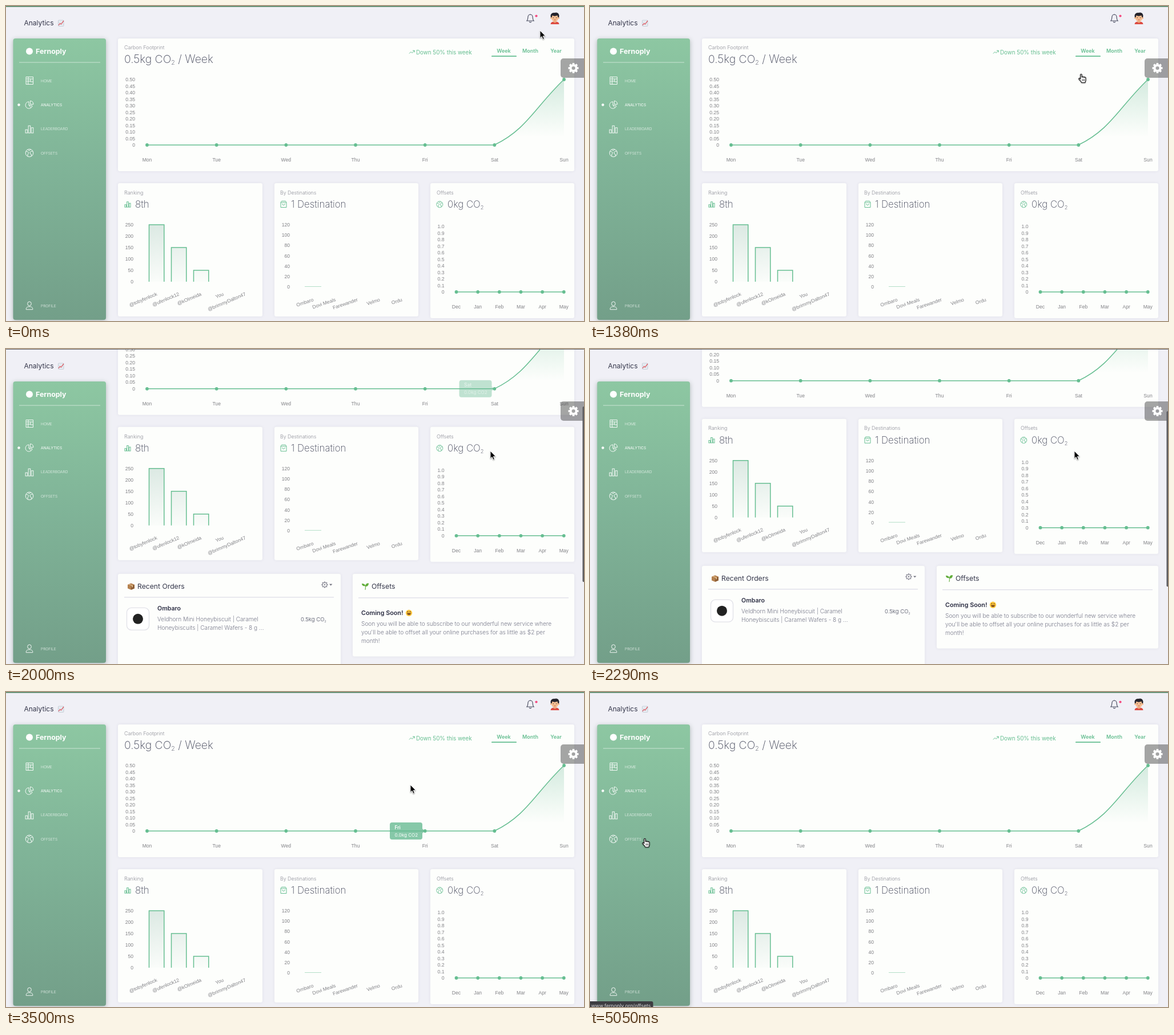
An HTML page with a canvas that plays this animation: 1012 by 553 pixels, repeating every 5090 ms.

```html
<!DOCTYPE html>
<html lang="en">
<head>
<meta charset="utf-8">
<title>Analytics</title>
<style>
html, body { margin: 0; width: 100%; height: 100%; overflow: hidden; background: #f0f0f6; }
canvas { display: block; width: 1012px; height: 553px; }
</style>
</head>
<body>
<canvas id="stage"></canvas>
<script>
const W = 1012, H = 553, LOOP = 5090;
const GREEN = '#66be91', DARK = '#44475b', GREY = '#8c8c97', AXIS = '#818186';
const UI = 'Inter, "Open Sans", sans-serif';
const CHART = '"Liberation Sans", Arial, sans-serif';

const canvas = document.getElementById('stage');
const dpr = window.devicePixelRatio || 1;
canvas.width = W * dpr;
canvas.height = H * dpr;
const c = canvas.getContext('2d');

// Rows of [time, value, ...]
const SCROLL = [[1450, 0], [2000, 174], [2190, 190], [2300, 188], [2590, 93], [2900, 0]];
const POINTER = [
  [0, 935, 43], [450, 925, 62], [950, 872, 76], [1200, 866, 83], [1380, 860, 119],
  [1560, 848, 179], [2680, 848, 179], [3100, 800, 196], [3500, 708, 163],
  [3850, 728, 90], [4210, 769, 26], [4420, 740, 34], [4920, 120, 246], [5050, 96, 257]
];

// Monotone cubic through the keys, flat at turning points
function track(keys, t, k = 1) {
  const last = keys.length - 1;
  if (t <= keys[0][0]) return keys[0][k];
  if (t >= keys[last][0]) return keys[last][k];
  let i = 0;
  while (t >= keys[i + 1][0]) i++;
  const rate = j => (keys[j + 1][k] - keys[j][k]) / (keys[j + 1][0] - keys[j][0]);
  const slope = j => {
    if (j === 0 || j === last) return 0;
    const a = rate(j - 1), b = rate(j);
    return a * b <= 0 ? 0 : 2 * a * b / (a + b);
  };
  const d = keys[i + 1][0] - keys[i][0], u = (t - keys[i][0]) / d, v = 1 - u;
  return keys[i][k] * v * v * (1 + 2 * u) + slope(i) * d * u * v * v +
    keys[i + 1][k] * u * u * (3 - 2 * u) - slope(i + 1) * d * u * u * v;
}

const clamp = v => Math.max(0, Math.min(1, v));
const pulse = (t, a, b, up, down) => clamp((t - a) / up) * clamp((b - t) / down);

function text(s, x, y, size, color, weight = 400, align = 'left', family = UI) {
  c.font = `${weight} ${size}px ${family}`;
  c.fillStyle = color;
  c.textAlign = align;
  c.fillText(s, x, y);
  return c.measureText(s).width;
}

function co2(before, after, x, y, size, weight = 200) {
  x += text(before + 'CO', x, y, size, DARK, weight);
  x += text('2', x, y + size * .17, size * .55, DARK, weight);
  text(after, x, y, size, DARK, weight);
}

function box(x, y, w, h, r, fill) {
  c.beginPath();
  c.roundRect(x, y, w, h, r);
  c.fillStyle = fill;
  c.fill();
}

function dot(x, y, r, fill) {
  c.beginPath();
  c.arc(x, y, r, 0, 7);
  c.fillStyle = fill;
  c.fill();
}

function line(points, color, width = 1) {
  c.beginPath();
  points.forEach(([x, y]) => c.lineTo(x, y));
  c.strokeStyle = color;
  c.lineWidth = width;
  c.stroke();
}

// Path data drawn with its zero point at x, y
function shape(d, x, y, fill, stroke, width = 1) {
  const p = new Path2D(d);
  c.save();
  c.translate(x, y);
  if (fill) { c.fillStyle = fill; c.fill(p); }
  if (stroke) { c.strokeStyle = stroke; c.lineWidth = width; c.stroke(p); }
  c.restore();
}

function fade(y0, y1, from, to) {
  const g = c.createLinearGradient(0, y0, 0, y1);
  g.addColorStop(0, from);
  g.addColorStop(1, to);
  return g;
}

function card(x, y, w, h) {
  c.save();
  c.shadowColor = 'rgba(90,90,130,.1)';
  c.shadowBlur = 5 * dpr;
  box(x, y, w, h, 3, '#fdfefc');
  c.restore();
}

function ticks(labels, right, top, step) {
  labels.forEach((s, i) => text(s, right, top + i * step + 3, 8.6, AXIS, 400, 'right', CHART));
}

function slanted(labels, x, y, step, deg) {
  labels.forEach((s, i) => {
    c.save();
    c.translate(x + i * step, y);
    c.rotate(-deg * Math.PI / 180);
    text(s, 0, 3, 8.6, AXIS, 400, 'right', CHART);
    c.restore();
  });
}

function barsIcon(x, y, k, color, width) {
  const u = v => v * k;
  c.strokeStyle = color;
  c.lineWidth = width;
  [[-6, 5], [-1.6, 11], [2.8, 8]].forEach(([dx, h]) =>
    c.strokeRect(x + u(dx), y + u(6 - h), u(3.1), u(h)));
}

function globe(x, y, r, color, width) {
  c.save();
  c.translate(x, y);
  c.scale(r / 7, r / 7);
  shape('M7 0A7 7 0 1 1-7 0A7 7 0 1 1 7 0M-6-3L-3-2L-1 0L-3 2L-3 6M-3-6L-1-4L1-5L2-6.5M6-3L3-3L1-1L2 2L4 3L3 6',
    0, 0, null, color, width * 7 / r);
  c.restore();
}

function gear(x, y, r, color) {
  c.save();
  c.translate(x, y);
  c.fillStyle = c.strokeStyle = color;
  for (let i = 0; i < 8; i++) {
    c.fillRect(-r * .2, -r, r * .4, r * .5);
    c.rotate(Math.PI / 4);
  }
  c.beginPath();
  c.arc(0, 0, r * .56, 0, 7);
  c.lineWidth = r * .44;
  c.stroke();
  c.restore();
}

function header() {
  shape('M-6 4C-4 2-4.5-1-4-3A4 4 0 0 1 4-3C4.5-1 4 2 6 4ZM-1.7 5.5A1.8 1.8 0 0 0 1.7 5.5M0-7V-8', 918, 22, null, DARK, 1.1);
  dot(928.5, 17.5, 2.1, '#f5487f');
  shape('M-7.5 10C-7 6-4 5.5 0 5.5S7 6 7.5 10Z', 961, 22, '#dd4b42');
  box(958.5, 23, 5, 6.5, 2, '#e9a678');
  dot(954.5, 21, 1.6, '#f0b185');
  dot(967.5, 21, 1.6, '#f0b185');
  box(954.8, 13, 12.4, 14, 6, '#f5bd91');
  shape('M-7-2C-9-8-4-11 0-10C5-12 9-7 7-2L5.5-2L4.5-5.5C1-4-2-4-4.5-5.5L-5.5-2Z', 961, 22, '#24232c');
  dot(958.4, 20.6, .7, '#333');
  dot(963.6, 20.6, .7, '#333');
  line([[959.4, 24], [961, 24.6], [962.6, 24]], '#b84f47', .8);
}

function footprint() {
  card(196, 57, 799, 233);
  text('Carbon Footprint', 207, 76, 9, GREY, 300);
  co2('0.5kg ', ' / Week', 207, 100, 19.4);
  line([[706, 83.5], [709, 80.5], [711, 82.5], [715, 78.5]], GREEN, 1);
  line([[712, 78.2], [715.3, 78.2], [715.3, 81.4]], GREEN, 1);
  text('Down 50% this week', 718, 84.5, 9.8, GREEN);
  [['Week', 871.5], ['Month', 918], ['Year', 963]].forEach(([s, x]) => text(s, x, 82.3, 9, GREEN, 600, 'center'));
  box(850, 87.3, 44, 1.7, 1, GREEN);

  ticks(['0.50', '0.45', '0.40', '0.35', '0.30', '0.25', '0.20', '0.15', '0.10', '0.05', '0'], 226, 129, 11.5);
  const rise = 'M855 244C911.5 217.4 928.3 175 977 129';
  shape(rise + 'V244Z', 0, 0, fade(129, 230, 'rgba(102,180,145,.27)', 'rgba(102,190,145,0)'));
  shape('M247 244H855' + rise.slice(8), 0, 0, null, GREEN, 1.5);
  ['Mon', 'Tue', 'Wed', 'Thu', 'Fri', 'Sat', 'Sun'].forEach((s, i) => {
    const x = 247 + i * 121.67;
    dot(x, i < 6 ? 244 : 129, 2.9, GREEN);
    text(s, x, 273, 8.6, AXIS, 400, 'center', CHART);
  });
}

function ranking() {
  card(196, 311, 253, 234);
  text('Ranking', 207, 330.7, 9, GREY, 300);
  barsIcon(213, 348, .85, GREEN, 1);
  text('8th', 226, 354, 17, DARK, 200);
  ticks(['250', '200', '150', '100', '50', '0'], 223, 384, 20);
  [[250, 384], [289, 424], [328, 464]].forEach(([x, y]) => {
    c.fillStyle = fade(384, 484, 'rgba(110,165,145,.23)', 'rgba(110,165,145,.02)');
    c.fillRect(x, y, 27, 484 - y);
    line([[x + .5, 484], [x + .5, y], [x + 26.8, y], [x + 26.8, 484]], GREEN, 1.5);
  });
  slanted(['@tobyfenlock', '@ufenlock12', '@kOlmeida', 'You', '@brimmyDalton47'], 264, 505, 38.8, 23);
}

function destinations() {
  card(470, 311, 252, 234);
  text('By Destinations', 480, 330.7, 8.8, GREY, 300);
  shape('M-5-3L-3.5-5.5H3.5L5-3V5.5H-5ZM-5-3H5M-2.3-.8A2.3 2.3 0 0 0 2.3-.8', 486, 348, null, GREEN, 1);
  text('1 Destination', 499, 354, 16.8, DARK, 200);
  ticks(['120', '100', '80', '60', '40', '20', '0'], 497, 384, 18.2);
  line([[523, 492.5], [552, 492.5]], '#b4dfc8', 1);
  slanted(['Ombaro', 'Dovi Meals', 'Farewander', 'Velmo', 'Ordu'], 538, 515, 38.8, 19);
}

function offsets() {
  card(743, 311, 252, 237);
  text('Offsets', 754, 330.7, 9, GREY, 300);
  globe(759.3, 348.3, 5.5, GREEN, .9);
  co2('0kg ', '', 773, 354, 16.8);
  ticks(['1.0', '0.9', '0.8', '0.7', '0.6', '0.5', '0.4', '0.3', '0.2', '0.1', '0'], 767.5, 387, 11.5);
  line([[788.5, 502], [977, 502]], GREEN, 1.5);
  ['Dec', 'Jan', 'Feb', 'Mar', 'Apr', 'May'].forEach((s, i) => {
    const x = 788.5 + i * 37.65;
    dot(x, 502, 2.9, GREEN);
    text(s, x, 531, 8.6, AXIS, 400, 'center', CHART);
  });
}

function orders() {
  card(196, 569, 390, 260);
  shape('M-6-3L0-5.5L6-3V3.5L0 6L-6 3.5Z', 219, 591, '#b5814f');
  shape('M0-.5L6-3V3.5L0 6Z', 219, 591, '#8f6038');
  shape('M-3-4.2L3-1.8V1L1.2 1.6V-1L-4.5-3.6Z', 219, 591, '#e2c08f');
  text('Recent Orders', 230, 595.5, 12.2, '#34364a');
  gear(558, 588, 5.6, '#92929d');
  dot(558, 588, 3.2, '#fdfefc');
  dot(558, 588, 1.4, '#92929d');
  shape('M-2.7-1.3H2.7L0 1.6Z', 568.7, 588, '#72727e');
  line([[207, 610], [574, 610]], '#d5d4e2', 1);
  box(211.5, 628.5, 39, 39, 8, '#fff');
  c.strokeStyle = '#e1e1e8';
  c.lineWidth = 1.3;
  c.stroke();
  dot(231, 648, 9, '#222');
  text('Ombaro', 265, 633, 10.6, '#2b2d42', 600);
  text('Veldhorn Mini Honeybiscuit | Caramel', 265, 652, 10.1, '#77788a', 300);
  text('Honeybiscuits | Caramel Wafers - 8 g ...', 265, 667, 10.1, '#77788a', 300);
  co2('0.5kg ', '', 516, 652.5, 9.6, 300);
}

function soon() {
  card(607, 569, 388, 145);
  shape('M-.6 6C0 3 0 1-.5-1C-4 0-6-2-6-5C-2.5-5-.5-3.5 .2-1.5C.5-4 2.5-6 6-5.5C6-2 4 .3 .8 0C1 2 1 4 .6 6Z', 629, 591, '#62ad3c');
  text('Offsets', 640, 595.5, 12.2, '#34364a');
  line([[617, 611], [985, 611]], '#d5d4e2', 1);
  text('Coming Soon!', 622, 641.5, 10.8, '#2b2d42', 600);
  dot(705.5, 637.5, 5.6, '#fbc53b');
  shape('M-3.5 .5H3.5C3 4.5-3 4.5-3.5 .5Z', 705.5, 637.5, '#6f3c1c');
  dot(703.5, 635.6, .9, '#5c351b');
  dot(707.5, 635.6, .9, '#5c351b');
  ['Soon you will be able to subscribe to our wonderful new service where',
    "you'll be able to offset all your online purchases for as little as $2 per",
    'month!'].forEach((s, i) => text(s, 622, 660 + i * 15, 10.1, '#77788a', 300));
}

function tooltip(day, x, alpha) {
  if (alpha <= 0) return;
  c.save();
  c.globalAlpha = alpha;
  box(x - 61.5, 229, 57, 30, 4, 'rgba(102,185,145,.78)');
  shape('M0-4L4 0L0 4Z', x - 4.5, 244, 'rgba(102,185,145,.78)');
  text(day, x - 53, 240.5, 8.4, '#fff', 600);
  text('0.0kg CO2', x - 53, 253.5, 8.1, '#fff');
  c.restore();
}

function sidebar() {
  c.save();
  c.shadowColor = 'rgba(70,95,85,.4)';
  c.shadowBlur = 9 * dpr;
  c.shadowOffsetY = 2 * dpr;
  const g = c.createLinearGradient(0, 57, 0, 551);
  g.addColorStop(0, '#8dc7a2');
  g.addColorStop(.45, '#80b498');
  g.addColorStop(1, '#739f89');
  box(12.5, 57, 162.5, 494, 4, g);
  c.restore();

  dot(41, 79.5, 6, '#fff');
  text('Fernoply', 52, 83.8, 12.4, '#fff', 700);
  line([[23, 99], [165, 99]], 'rgba(255,255,255,.55)', 1);
  dot(22.5, 173.5, 2.2, '#fff');
  const ink = 'rgba(255,255,255,.9)';
  shape('M-6-6.5H6.5V6.5H-6ZM-6-3H6.5M-2-6.5V6.5M2-3V2M-6 1H2M2 2H6.5M-4.5 4H-3.5', 41, 131, null, ink, 1);
  shape('M-1-5.5A6 6 0 1 0 5 1.5L-1 .5ZM1.5-7A6.2 6.2 0 0 1 7-1L1.5-1ZM-1 .5L3 5.3', 41, 173.5, null, ink, 1);
  barsIcon(41, 216, 1.15, ink, 1);
  globe(41, 258, 6.8, ink, 1);
  shape('M3.3-3.3A3.3 3.7 0 1 1-3.3-3.3A3.3 3.7 0 1 1 3.3-3.3M-5.8 6.8C-6 2.5-3 1.8 0 1.8S6 2.5 5.8 6.8Z', 41, 526, null, ink, 1);
  [['HOME', 131], ['ANALYTICS', 173.3], ['LEADERBOARD', 215.7], ['OFFSETS', 258], ['PROFILE', 526]].forEach(([s, y]) =>
    text(s, 61, y + 2.5, 6.6, s === 'ANALYTICS' ? '#fff' : 'rgba(255,255,255,.85)', s === 'ANALYTICS' ? 400 : 300));
}

function title() {
  text('Analytics', 31.5, 34.3, 12, '#34364a');
  box(91.5, 25, 9.5, 10.5, 1, '#e9eef3');
  c.strokeStyle = '#adb9c6';
  c.lineWidth = .6;
  c.stroke();
  line([[92, 28.5], [101, 28.5]], '#c3d0dc', .5);
  line([[92, 32], [101, 32]], '#c3d0dc', .5);
  line([[92, 34], [94.5, 30.5], [96.5, 32], [101, 25.8]], '#dc4b54', 1.2);
}

function settings() {
  box(971, 92, 45, 34, 5, 'rgba(60,60,60,.46)');
  gear(993.5, 109, 9, '#fff');
}

function pointer(t) {
  const x = track(POINTER, t, 1), y = track(POINTER, t, 2);
  const hand = (t > 900 && t < 1430) || t > 4925;
  c.save();
  c.lineJoin = 'round';
  c.shadowColor = 'rgba(0,0,0,.3)';
  c.shadowBlur = 2 * dpr;
  c.shadowOffsetY = dpr;
  if (hand) {
    shape('M3.2 9V1.6a1.3 1.3 0 0 1 2.6 0V5.6a1.2 1.2 0 0 1 2.3.2a1.2 1.2 0 0 1 2.3.4a1.2 1.2 0 0 1 2.2.8V11c0 1.6-.9 2.6-1.1 4.2H5.2C4.8 13 2.4 11.4.6 9.3c-.9-1.1.6-2.5 1.7-1.5z',
      x - 4.5, y, '#fff', '#111', 1.1);
    c.shadowColor = 'transparent';
    shape('M6.5 9V12.5M8.3 9V12.5M10.1 9V12.5', x - 4.5, y, null, '#111', .7);
  } else {
    shape('M0 0V13.4L3 10.6L5.1 15.5L7.4 14.5L5.3 9.8H9.5Z', x, y, '#000', '#fff', 1);
  }
  c.restore();
}

function draw(t) {
  const scroll = track(SCROLL, t);
  c.setTransform(dpr, 0, 0, dpr, 0, 0);
  c.fillStyle = '#f0f0f6';
  c.fillRect(0, 0, W, H);

  c.save();
  c.translate(0, -scroll);
  [header, footprint, ranking, destinations, offsets, orders, soon].forEach(f => f());
  tooltip('Sat', 855, pulse(t, 1420, 2080, 150, 150));
  tooltip('Sat', 855, pulse(t, 2680, 3180, 150, 100));
  tooltip('Fri', 733.5, pulse(t, 3140, 3780, 100, 200));
  c.restore();

  title();
  sidebar();
  settings();
  c.fillStyle = scroll > 1 ? '#66666c' : '#4f8262';
  c.fillRect(0, 0, W, scroll > 1 ? 1 : 1.6);

  const bar = pulse(t, 1450, 3250, 80, 250);
  if (bar > 0) {
    c.globalAlpha = bar;
    box(1009.5, scroll * .58, 4, 308, 2, '#5c5c60');
    c.globalAlpha = 1;
  }
  if (t >= 4985) {
    box(-4, 543, 114.5, 14, 3, '#3d3d41');
    text('www.fernoply.org/offsets', 2, 554, 8.7, '#d5d5d8');
  }
  pointer(t);
}

const start = performance.now();
function tick() {
  draw((performance.now() - start) % LOOP);
  requestAnimationFrame(tick);
}
tick();
</script>
</body>
</html>
```
